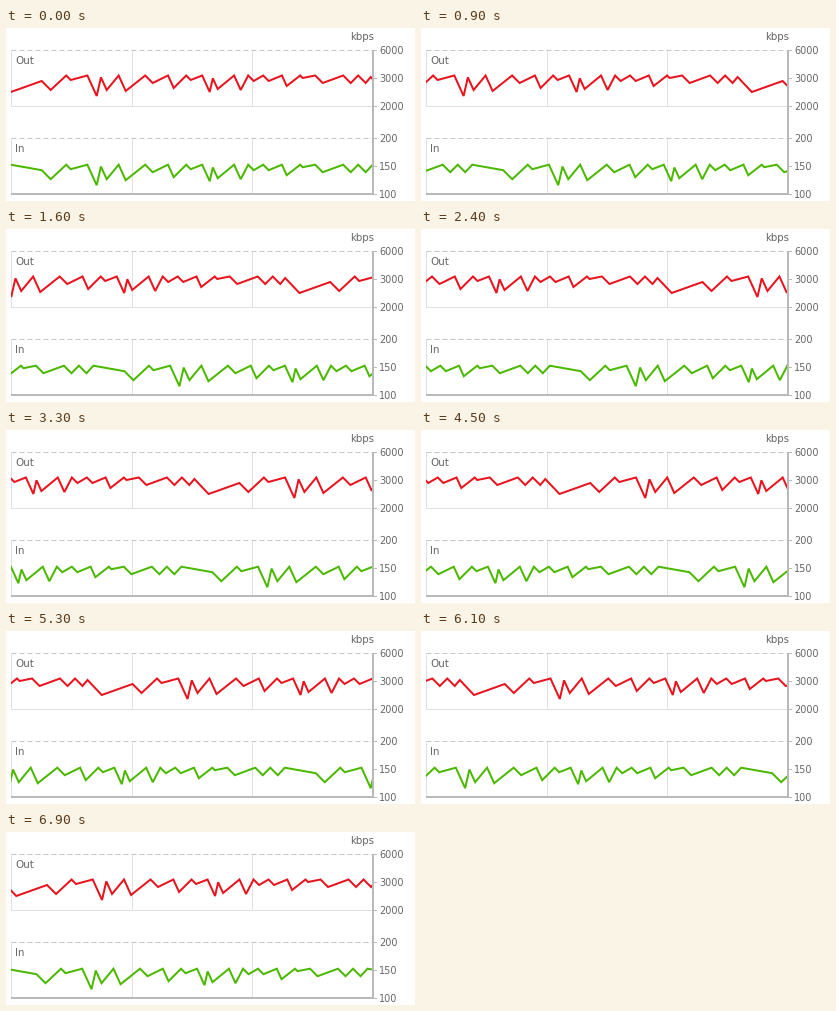
Recreate the animation shown at these times as a matplotlib script. Size 409x173 px, loop 7 s.

```python
import matplotlib.pyplot as plt
import numpy as np
from matplotlib.animation import FuncAnimation
from matplotlib.patches import Rectangle

W, H, DPI = 409, 173, 64
FRAMES, INTERVAL = 70, 100
PX = 72 / DPI  # points per pixel

LEFT, RIGHT, STEP = 5, 366.5, 28
RED, GREEN = "#e8131d", "#4bb800"
AXIS, DASH, GRID, TEXT = "#b9b9b9", "#c6c6c6", "#e0e0e0", "#666666"

# The traffic runs along a ceiling and drops into these dips (x, y below panel top)
CEILING, RISE = 25.5, 4.4
DIPS = [(45, 40), (65, 30), (91, 46), (101, 40), (120, 41), (147, 33),
        (168, 38), (185, 30), (204, 42), (212, 39), (235, 40), (248, 31),
        (263, 31), (281, 36), (297, 28), (317, 33), (345, 33), (360, 33)]
SLOPE_END = (36, 31)

fig = plt.figure(figsize=(W / DPI, H / DPI), dpi=DPI, facecolor="white")
ax = fig.add_axes([0, 0, 1, 1])
ax.set_xlim(-0.5, W - 0.5)
ax.set_ylim(H - 0.5, -0.5)
ax.axis("off")


def segment(x0, y0, x1, y1, color, width=1, zorder=1, **style):
    ax.plot([x0, x1], [y0, y1], color=color, lw=width * PX, zorder=zorder,
            solid_capstyle="butt", dash_capstyle="butt", snap=False, **style)


def label(x, y, text, ha="left", size=9.7):
    ax.text(x, y, text, color=TEXT, fontsize=size * PX, ha=ha,
            va="center_baseline", family="DejaVu Sans", zorder=5)


def panel(top, title, ticks):
    bottom = top + 2 * STEP
    for x in (LEFT, 126, 246):
        segment(x, top, x, bottom, GRID)
    segment(LEFT, bottom, RIGHT, bottom, GRID)
    segment(LEFT, top, RIGHT, top, DASH, dashes=(5, 3))
    for i, value in enumerate(ticks):
        y = top + STEP * i
        segment(RIGHT, y, RIGHT + 4, y, AXIS, zorder=4)
        label(RIGHT + 6, y - 1, value)
    label(8.5, top + 9.5, title, size=10.3)


def peak(dip, following):
    """Top between two dips: deep falls are steep, shallow ones gentle."""
    (x0, y0), (x1, y1) = dip, following
    fall = 2.2 if y1 - CEILING > 9 else 1
    from_ceiling = x1 - (y1 - CEILING) / fall
    crossing = x0 + (y0 - y1 + fall * (x1 - x0)) / (RISE + fall)
    x = max(from_ceiling, crossing)
    return x, y1 - fall * (x1 - x)


def profile(start, period, *end):
    """One period of the curve, repeated to both sides."""
    points = [start, SLOPE_END, DIPS[0]]
    for dip, following in zip(DIPS, DIPS[1:]):
        points += [peak(dip, following), following]
    x, y = np.array(points + list(end)).T
    shifts = range(-1, 3)
    return np.concatenate([x + k * period for k in shifts]), np.tile(y, len(shifts))


def trace(color):
    line, = ax.plot([], [], color=color, lw=2 * PX, zorder=3,
                    solid_joinstyle="miter")
    line.set_clip_path(Rectangle((LEFT - 0.5, 0), RIGHT - LEFT, H,
                                 transform=ax.transData))
    return line


panel(22, "Out", ("6000", "3000", "2000"))
panel(110, "In", ("200", "150", "100"))
label(367.5, 7.5, "kbps", ha="right", size=10.3)
segment(RIGHT, 21.5, RIGHT, 166.5, AXIS, width=2, zorder=4)
segment(LEFT - 0.5, 165.5, RIGHT + 1, 165.5, AXIS, width=2, zorder=4)

OUT_PERIOD, IN_PERIOD = 374, 362
out_x, out_y = profile((5.2, 42), OUT_PERIOD, (365, 27))
in_x, in_y = profile((5, CEILING), IN_PERIOD)
out_line, in_line = trace(RED), trace(GREEN)


def draw(i):
    phase = i / FRAMES
    out_line.set_data(out_x - 0.8 - OUT_PERIOD * phase, out_y + 21.5)
    in_line.set_data(in_x - 0.8 + IN_PERIOD * phase, in_y + 110.7)
    return out_line, in_line


anim = FuncAnimation(fig, draw, frames=FRAMES, interval=INTERVAL,
                     init_func=lambda: draw(0), repeat=True, repeat_delay=0)
plt.show()
```
